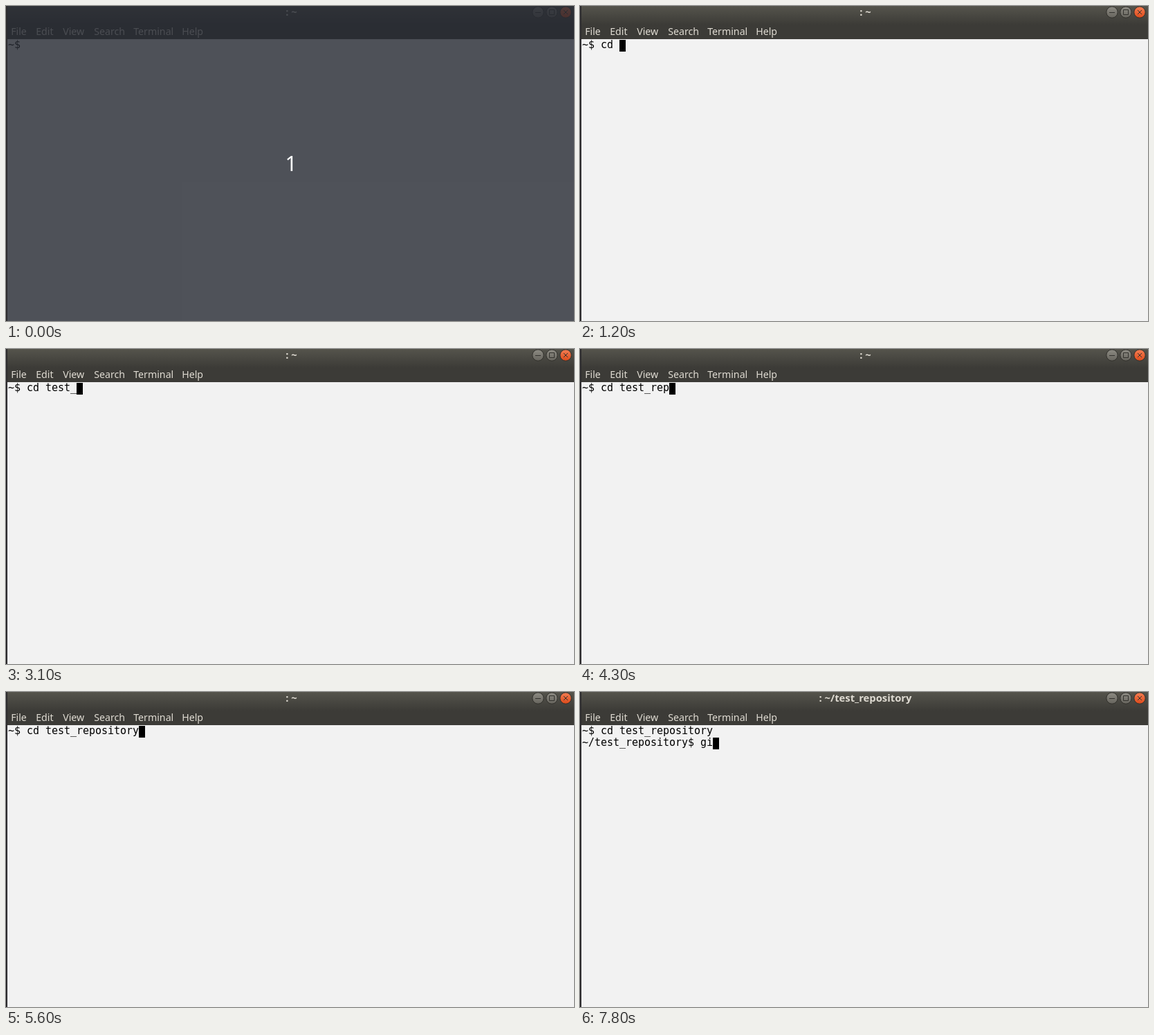
Recreate the animation shown at these times as an HTML page. Size 821 by 456 pixels, loop 8000 ms.

```html
<!DOCTYPE html>
<html lang="en">
<head>
<meta charset="utf-8">
<title>Terminal</title>
<style>
  html, body { margin: 0; width: 100%; height: 100%; overflow: hidden; background: #f2f2f2; }
  svg { display: block; width: 821px; height: 456px; }
  text { white-space: pre; }
  .bar { font-family: "Noto Sans", "Open Sans", sans-serif; fill: #dfdbd2; }
  .menu { font-size: 14.2px; }
  .title { font-size: 14.8px; font-weight: 700; text-anchor: middle; }
  .term { font: 15px "DejaVu Sans Mono", monospace; letter-spacing: -.03px; fill: #000; }
  .count { font: 30px "Noto Sans", sans-serif; fill: #fff; text-anchor: middle; }
  .sign { fill: none; stroke: #33322e; }
</style>
</head>
<body>
<svg viewBox="0 0 821 456" xmlns="http://www.w3.org/2000/svg">
  <defs>
    <linearGradient id="head" x2="0" y2="1">
      <stop offset="0" stop-color="#55544c"/>
      <stop offset="1" stop-color="#3c3b37"/>
    </linearGradient>
    <linearGradient id="gray" x2="0" y2="1">
      <stop offset="0" stop-color="#8d8b83"/>
      <stop offset="1" stop-color="#66645d"/>
    </linearGradient>
    <linearGradient id="orange" x2="0" y2="1">
      <stop offset="0" stop-color="#f37e54"/>
      <stop offset="1" stop-color="#dc4a1a"/>
    </linearGradient>
  </defs>

  <rect width="821" height="456" fill="#f2f2f2"/>
  <rect width="821" height="48" fill="#3c3b37"/>
  <rect width="821" height="27" fill="url(#head)"/>

  <g stroke="#302f2b">
    <circle cx="769" cy="9" r="8.2" fill="url(#gray)"/>
    <circle cx="789" cy="9" r="8.2" fill="url(#gray)"/>
    <circle cx="809" cy="9" r="8.2" fill="url(#orange)"/>
  </g>
  <path class="sign" d="M765 9.5h8M785.5 5.5h7v7h-7zM806 6l6 6M812 6l-6 6"/>

  <text id="title" class="bar title" x="412.5" y="14"></text>
  <g id="menu" class="bar menu"></g>

  <text id="line1" class="term" x="3" y="61"></text>
  <text id="line2" class="term" x="3" y="78"></text>
  <rect id="cursor" width="9" height="17"/>

  <g id="veil">
    <rect width="821" height="456" fill="#262a33" fill-opacity=".8"/>
    <text class="count" x="412" y="239">1</text>
  </g>
  <rect width="2" height="456" fill="#2c2b2d"/>
</svg>
<script>
const LOOP = 8000, CELL = 9, ROW = 17, LEFT = 3, TOP = 49;
const $ = id => document.getElementById(id);

const COMMAND = "cd test_repository";
const ENTER = 6500;
// [time, characters typed so far]
const KEYS = [[1000, 1], [1200, 3], [2000, 4], [2100, 5], [2300, 7], [3100, 8],
  [3600, 10], [4300, 11], [4500, 12], [4700, 13], [5000, 14], [5300, 15],
  [5500, 17], [5600, 18]];
const NEXT_KEYS = [[7800, 2]];
// spans in which the cursor is blinked off
const HIDDEN = [[0, 500], [600, 900], [1700, 1800], [6600, 7200]];

const MENU = { File: 8, Edit: 44, View: 83, Search: 128, Terminal: 185, Help: 255 };
for (const [label, x] of Object.entries(MENU)) {
  const item = document.createElementNS("http://www.w3.org/2000/svg", "text");
  item.setAttribute("x", x - .8);
  item.setAttribute("y", 42);
  item.textContent = label;
  $("menu").append(item);
}

const typed = (keys, t) => keys.reduce((n, [at, count]) => t >= at ? count : n, 0);

function draw(t) {
  const entered = t >= ENTER;
  const first = "~$ " + COMMAND.slice(0, typed(KEYS, t));
  const second = entered ? "~/test_repository$ " + "gi".slice(0, typed(NEXT_KEYS, t)) : "";
  const off = HIDDEN.some(([from, to]) => t >= from && t < to);

  $("title").textContent = entered ? ": ~/test_repository" : ": ~";
  $("line1").textContent = first;
  $("line2").textContent = second;
  $("cursor").setAttribute("x", LEFT + CELL * (entered ? second : first).length);
  $("cursor").setAttribute("y", entered ? TOP + ROW : TOP);
  $("cursor").setAttribute("visibility", off ? "hidden" : "visible");
  $("veil").setAttribute("visibility", t < 500 ? "visible" : "hidden");
}

const start = performance.now();
function tick() {
  draw((performance.now() - start) % LOOP);
  requestAnimationFrame(tick);
}
tick();
</script>
</body>
</html>
```
